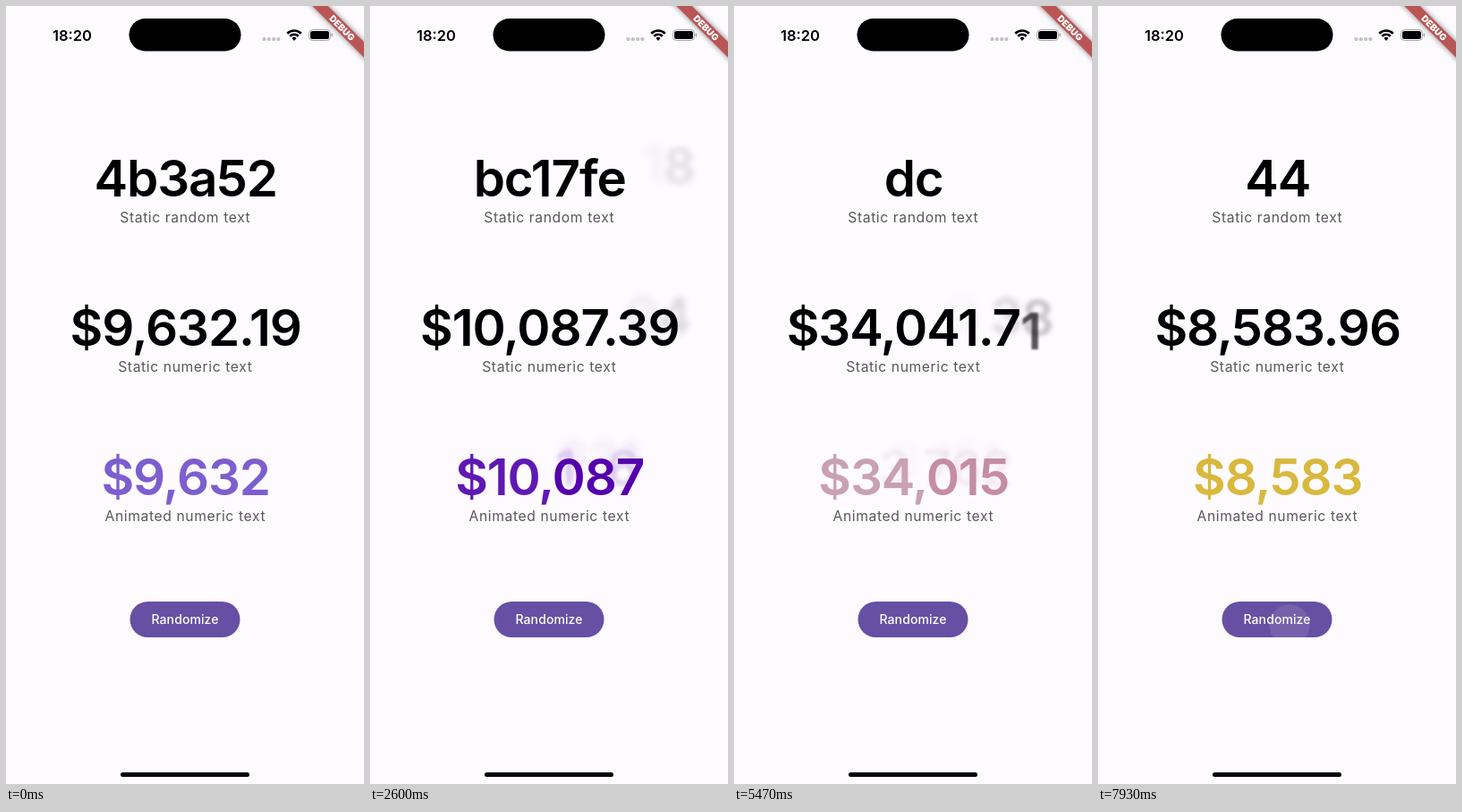
An HTML page with a canvas that plays this animation: 400 px wide and 870 px high, repeating every 8000 ms.

```html
<!DOCTYPE html>
<html lang="en">
<head>
<meta charset="utf-8">
<title>Numeric text</title>
<style>
  html, body { margin: 0; width: 100%; height: 100%; overflow: hidden; background: #fefbff; }
  canvas { display: block; width: 400px; height: 870px; }
</style>
</head>
<body>
<canvas id="stage" width="400" height="870"></canvas>
<script>
const ctx = document.getElementById('stage').getContext('2d');
const LOOP = 8000;
const BIG = '600 56.5px Inter, sans-serif';

// start: when the texts change to this state
const states = [
  { start: -2000, hex: '4b3a52', num: 9632.19, color: [124, 94, 207] },
  { start: 1060, hex: '523c2f18', num: 41984.04, color: [180, 219, 230] },
  { start: 2070, hex: 'bc17fe', num: 10087.39, color: [84, 0, 172] },
  { start: 3130, hex: 'c9', num: 28349.78, color: [149, 64, 248] },
  { start: 3990, hex: 'e7', num: 12630.38, color: [217, 250, 250] },
  { start: 4988, hex: 'dc', num: 34041.71, color: [197, 140, 160] },
  { start: 5870, hex: 'b27aff71', num: 27437.10, color: [196, 182, 115] },
  { start: 6882, hex: '44', num: 8583.96, color: [217, 184, 62] }
];
const presses = [970, 2040, 3040, 3930, 4870, 5800, 6850, 7790];

const clamp = v => Math.max(0, Math.min(1, v));
const lerp = (a, b, p) => a + (b - a) * p;
const easeOut = (u, n) => 1 - (1 - u) ** n;
const money = (v, digits) => '$' + v.toLocaleString('en-US',
  { minimumFractionDigits: digits, maximumFractionDigits: digits });
const mix = (a, b, p) => `rgb(${a.map((v, i) => Math.round(lerp(v, b[i], p)))})`;

function text(str, x, y, font, color, spacing = 0, align = 'center') {
  ctx.font = font;
  ctx.letterSpacing = spacing + 'px';
  ctx.fillStyle = color;
  ctx.textAlign = align;
  ctx.fillText(str, x + (align === 'center' ? spacing / 2 : 0), y);
}

function box(x, y, w, h, r, color) {
  ctx.fillStyle = color;
  ctx.beginPath();
  ctx.roundRect(x, y, w, h, r);
  ctx.fill();
}

// Left edge of every character in a centred line
function layout(str) {
  ctx.font = BIG;
  ctx.letterSpacing = '-1.1px';
  ctx.textAlign = 'left';
  const left = 200.7 - ctx.measureText(str).width / 2;
  return [...str].map((c, i) =>
    left + ctx.measureText(str.slice(0, i + 1)).width - ctx.measureText(c).width);
}

function glyph(c, x, y, color, alpha = 1, blur = 0) {
  if (alpha <= 0.01) return;
  ctx.globalAlpha = alpha;
  ctx.filter = blur > 0.1 ? `blur(${blur}px)` : 'none';
  text(c, x, y, BIG, color, 0, 'left');
  ctx.globalAlpha = 1;
  ctx.filter = 'none';
}

// Characters that differ leave upwards while new ones rise, left to right
function swapText(from, to, y, elapsed, numeric) {
  const a = layout(from), b = layout(to);
  const p = clamp(elapsed / 480) ** (numeric ? 1 : 2);
  const shift = b[0] - a[0];
  const kept = new Set();
  [...to].forEach((c, i) => {
    let slot = i;
    if (numeric && i) {
      slot += from.length - to.length;
      if (slot < 1) slot = -1;
    }
    const x = lerp(a[slot] ?? b[i] - shift, b[i], p);
    if (from[slot] === c) {
      kept.add(slot);
      glyph(c, x, y, '#000');
    } else {
      const e = clamp((elapsed - 50 * i) / 50);
      glyph(c, x, y + 12 * (1 - e), '#000', e, 3 * (1 - e));
    }
  });
  [...from].forEach((c, i) => {
    if (kept.has(i)) return;
    const r = i / from.length;
    const e = clamp((elapsed - 200 * r) / (250 + 250 * r));
    glyph(c, a[i] + shift * p, y - 18 * e, '#000', (1 - e) ** 1.5, 9 * Math.max(0, e - .35));
  });
}

function counter(from, to, y, elapsed) {
  const at = ms => money(Math.floor(
    lerp(Math.floor(from.num), Math.floor(to.num), easeOut(clamp(ms / 540), 3))), 0);
  const now = at(elapsed);
  const slow = mix(from.color, to.color, clamp(elapsed / 600));
  const fresh = mix(from.color, to.color, easeOut(clamp(elapsed / 600), 3));
  for (const [lag, rise, alpha] of [[130, 20, .08], [70, 10, .18]]) {
    const old = at(elapsed - lag), xs = layout(old);
    [...old].forEach((c, i) => {
      if (c !== now[i + now.length - old.length]) glyph(c, xs[i], y - rise, slow, alpha, rise / 5);
    });
  }
  const xs = layout(now), comma = now.indexOf(',');
  [...now].forEach((c, i) => glyph(c, xs[i], y, i > comma ? fresh : slow));
}

function button(t) {
  box(138.5, 666, 123, 40, 20, '#674fa4');
  ctx.save();
  ctx.clip();
  for (const press of presses) {
    const age = t - press;
    if (age < 0 || age > 520) continue;
    const fade = .1 * clamp((520 - age) / 220);
    ctx.fillStyle = `rgba(255,255,255,${fade})`;
    ctx.beginPath();
    ctx.arc(214, 692, age < 150 ? 10 + age * .09 : 23.5 + (age - 150) * .9, 0, 7);
    ctx.fill();
  }
  ctx.restore();
  text('Randomize', 200, 691, '500 14px Inter, sans-serif', '#fff', .1);
}

function statusBar() {
  text('18:20', 74, 38.5, '600 16.5px Inter, sans-serif', '#000', 0);
  box(137.5, 14, 125, 36.5, 18.2, '#000');
  for (let i = 0; i < 4; i++) box(286.5 + i * 5.3, 35, 4, 4, 1.5, '#c4c2c6');

  ctx.strokeStyle = '#000';
  ctx.lineWidth = 2.6;
  for (const r of [11, 6.7]) {
    ctx.beginPath();
    ctx.arc(322, 38.5, r, -Math.PI * .75, -Math.PI * .25);
    ctx.stroke();
  }
  ctx.fillStyle = '#000';
  ctx.beginPath();
  ctx.moveTo(322, 39);
  ctx.arc(322, 38.5, 3.6, -Math.PI * .75, -Math.PI * .25);
  ctx.fill();

  ctx.strokeStyle = '#a5a3a7';
  ctx.lineWidth = 1;
  ctx.beginPath();
  ctx.roundRect(338.5, 26.5, 24, 12, 4);
  ctx.stroke();
  box(340, 28, 21, 9, 2.5, '#000');
  box(363.6, 30.5, 1.5, 4, 1, '#a5a3a7');
}

function banner() {
  ctx.save();
  ctx.translate(400, 0);
  ctx.rotate(Math.PI / 4);
  ctx.scale(1.018, 1.018);
  ctx.shadowColor = 'rgba(0,0,0,.5)';
  ctx.shadowBlur = 6;
  box(-60, 28, 120, 12, 0, '#b95555');
  ctx.shadowColor = 'transparent';
  text('DEBUG', 0, 37.6, '900 10px Inter, sans-serif', '#fff', 0);
  ctx.restore();
}

function draw(t) {
  ctx.fillStyle = '#fefbff';
  ctx.fillRect(0, 0, 400, 870);
  const i = states.findLastIndex(s => t >= s.start);
  const to = states[i], from = states[Math.max(0, i - 1)];
  const elapsed = t - to.start;

  swapText(from.hex, to.hex, 212.5, elapsed, false);
  swapText(money(from.num, 2), money(to.num, 2), 380, elapsed, true);
  counter(from, to, 547, elapsed);

  ['Static random text', 'Static numeric text', 'Animated numeric text'].forEach((label, n) =>
    text(label, 200, 242 + n * 167.2, '400 15.7px Inter, sans-serif', '#59575c', .6));
  button(t);
  statusBar();
  banner();
  box(128, 857, 144, 5, 2.5, '#000');
}

function frame() {
  draw(performance.now() % LOOP);
  requestAnimationFrame(frame);
}
frame();
</script>
</body>
</html>
```
